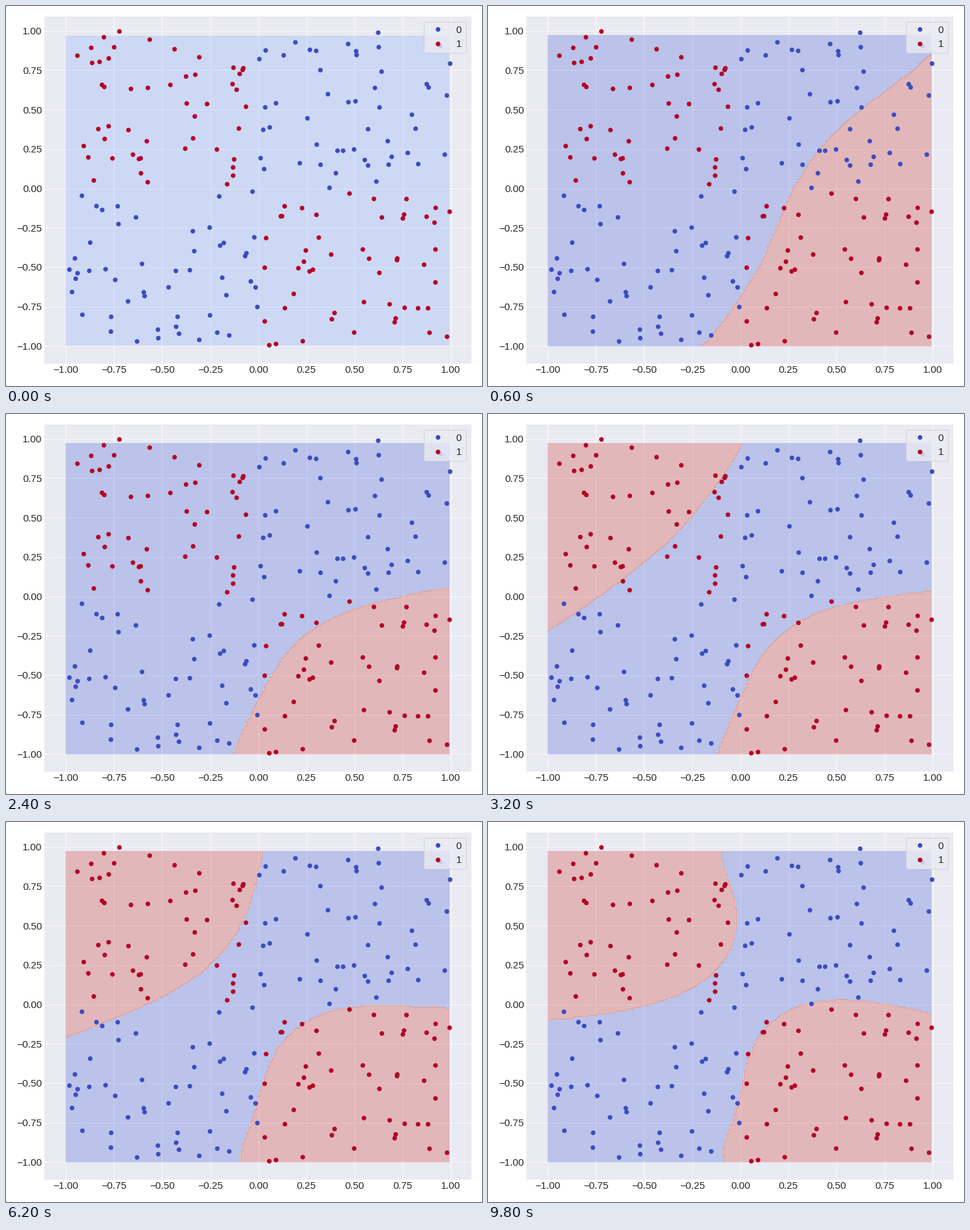
Write a matplotlib script that moves like this. It is 720 by 576 pixels and loops after 10 s.

```python
import numpy as np
import matplotlib.pyplot as plt
from matplotlib.animation import FuncAnimation

W, H, DPI = 720, 576, 72
FRAMES, STEP = 50, 200
X0, Y0, SX, SY = 381.7, 276.52, 291.4, 238.7   # stage position and scale of the data origin
LEFT, RIGHT, TOP, BOTTOM = 58, 703.8, 16.2, 542

plt.rcParams.update({
    "font.family": "Liberation Sans", "font.size": 15,
    "axes.facecolor": "#EAEAF2", "axes.edgecolor": "white", "axes.linewidth": 0,
    "axes.grid": True, "axes.axisbelow": True,
    "grid.color": "white", "grid.linestyle": "-", "grid.linewidth": 0.8,
    "text.color": ".15", "xtick.color": ".15", "ytick.color": ".15",
    "xtick.major.size": 0, "ytick.major.size": 0,
})
COOL = plt.get_cmap("coolwarm")

# Fifty random points per quadrant; equal signs are class 0, mixed signs class 1.
rng = np.random.default_rng(7)
signs = np.repeat([(1, 1), (-1, -1), (-1, 1), (1, -1)], 50, axis=0)
dots = signs * rng.uniform(0, 1, signs.shape)
labels = (signs[:, 0] != signs[:, 1]).astype(int)

gx, gy = np.meshgrid(np.linspace(-1, 0.992, 200), np.linspace(-1, 0.972, 198))


def ease_out(u):
    return 1 - (1 - u) ** 2


class Region:
    """Area around a corner whose radius is a polynomial of the angle.

    Each key holds the radius every 15 degrees, from along x to along y.
    """
    angles = np.radians(np.arange(0, 91, 15))

    def __init__(self, corner, keys):
        dx, dy = abs(gx - corner[0]), abs(gy - corner[1])
        self.angle, self.dist = np.arctan2(dy, dx), np.hypot(dx, dy)
        self.times = list(keys)
        self.polys = [np.polyfit(self.angles, r, 6) for r in keys.values()]

    def mask(self, t, grow):
        poly = [np.interp(t, self.times, c) for c in zip(*self.polys)]
        return self.dist < grow * np.polyval(poly, self.angle)


lower_right = Region((1, -1), {
    600: (1.2, 1.058, 1.038, 1.13, 1.316, 1.531, 1.865),
    2400: (1.13, 1.066, 1.061, 1.069, 1.05, 1.035, 1.054),
    4800: (1.1, 1.067, 1.106, 1.146, 1.105, 1.022, 0.995),
    9800: (1.08, 1.073, 1.132, 1.22, 1.18, 1.045, 0.934),
})
upper_left = Region((-1, 0.975), {
    3200: (1.014, 0.925, 0.885, 0.888, 0.924, 1.016, 1.195),
    4800: (1.077, 1.02, 0.994, 0.999, 1.029, 1.093, 1.232),
    9800: (0.912, 0.995, 1.121, 1.157, 1.118, 1.077, 1.075),
})


def predict(t):
    settle = 600 + 1800 * ease_out(np.clip((t - 600) / 1800, 0, 1))
    right = lower_right.mask(max(t, settle), ease_out(min(t / 600, 1)))
    left = upper_left.mask(t, ease_out(np.clip((t - 2400) / 800, 0, 1)))
    return (right | left).astype(float)


fig = plt.figure(figsize=(W / DPI, H / DPI), dpi=DPI, facecolor="white")
ax = fig.add_axes([LEFT / W, 1 - BOTTOM / H, (RIGHT - LEFT) / W, (BOTTOM - TOP) / H])
ticks = np.arange(-1, 1.01, 0.25)
ax.set_xticks(ticks)
ax.set_yticks(ticks)
points = ax.scatter(*dots.T, c=labels, cmap=COOL, zorder=2)
ax.legend(*points.legend_elements(), loc="upper right")
ax.set_xlim((LEFT - X0) / SX, (RIGHT - X0) / SX)
ax.set_ylim((Y0 - BOTTOM) / SY, (Y0 - TOP) / SY)
ax.set_autoscale_on(False)

LEVELS = np.arange(8) * 0.15
fills = []


def draw(i):
    while fills:
        fills.pop().remove()
    if i == 0:   # a single class so far: one even tint
        style = dict(levels=[-1, 1], colors=[COOL(0.25)])
    else:
        style = dict(levels=LEVELS, cmap=COOL, vmin=0, vmax=LEVELS[-1])
    fills.append(ax.contourf(gx, gy, predict(i * STEP), alpha=0.3, zorder=1, **style))
    return fills


anim = FuncAnimation(fig, draw, frames=FRAMES, interval=STEP, init_func=lambda: draw(0),
                     repeat=True, repeat_delay=0, blit=False)
plt.show()
```
